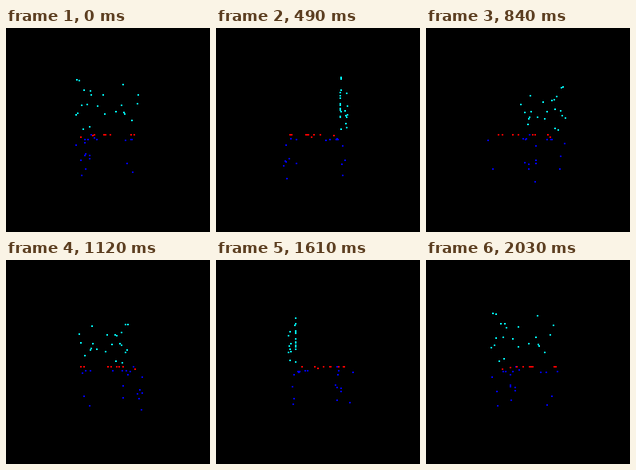
Write a matplotlib script that moves like this. It is 256 by 256 pixels and loops after 2100 ms.

```python
import numpy as np
import matplotlib.pyplot as plt
from matplotlib.animation import FuncAnimation

SIZE = 256
FRAMES = 30
INTERVAL = 70
CX, CY = 128, 134      # projected chair centre
CAMERA = 241           # camera distance from the turning axis


def panel(points, depth):
    """Points (across, down) on a vertical plane at the given depth."""
    return [(x, y, depth) for x, y in points]


# Chair points as (across, down, towards the viewer)
back = panel([(-34.9, -61), (-31.8, -60), (-26.1, -49.1), (-18.5, -44.6),
              (-5.3, -44.2), (-23, -33.2), (-11.5, -31.4), (-33.6, -24.3),
              (-27.4, -6.2), (16.8, -55.7), (33.6, -44.2), (15, -32.3),
              (17.7, -24.8), (18.6, -23)], 28)
back += panel([(-18.4, -46.9), (-28.2, -31.6), (-34.1, -21.3), (-3.4, -21.8),
               (-19.6, -8.5), (31.2, -33.3), (8.5, -24.8), (25.6, -15.4)], 35.2)

seat = [(-34.4, 2.8, -3.5), (-17, .5, 20), (-17.2, .3, -9.5), (-5.4, .4, 3.6),
        (-2.9, -.3, -33), (-4.6, .3, -35), (3.2, -.3, -15.7),
        (31.4, -.2, -19.7), (34.3, .4, -9.6)]

legs = [(-35.4, 11.4, 30.3), (-29, 27.7, 32.7), (-28.8, 44.5, 30.5),
        (-32.8, 11.3, -32), (-31.3, 26.8, -28.7), (-33.3, 29.4, -31.6),
        (-26.3, 30.3, -35), (-27, 35, -35.9), (-31.7, 48.6, -31.5),
        (26.8, 41, -33.7), (27.6, 41, 29.8)]
rim = [(-28, 5.8, 11.7), (-23.8, 5.6, 15.6), (-12.5, 5.8, 25),
       (19.5, 5.9, 22.7), (26, 5.8, 24.2), (34.8, 6.5, -35),
       (-19.1, 5, -30.4), (-23.5, .3, -29)]


def project(points, angle):
    x, y, z = points.T
    c, s = np.cos(angle), np.sin(angle)
    scale = CAMERA / (CAMERA - (z * c - x * s))
    return CX + scale * (x * c + z * s), CY + scale * y


fig = plt.figure(figsize=(SIZE / 72, SIZE / 72), dpi=72, facecolor="black")
ax = fig.add_axes([0, 0, 1, 1])
ax.set(xlim=(0, SIZE), ylim=(SIZE, 0))
ax.axis("off")

parts = []
for points, color in ((legs + rim, "#0000ff"), (seat, "#ff0000"), (back, "#00ffff")):
    dots, = ax.plot([], [], "s", color=color, ms=2, mew=0, antialiased=False)
    parts.append((dots, np.array(points)))


def update(i):
    angle = 2 * np.pi * i / FRAMES
    for dots, points in parts:
        dots.set_data(*project(points, angle))
    return [dots for dots, _ in parts]


anim = FuncAnimation(fig, update, frames=FRAMES, interval=INTERVAL,
                     repeat=True, repeat_delay=0, blit=False)
plt.show()
```
